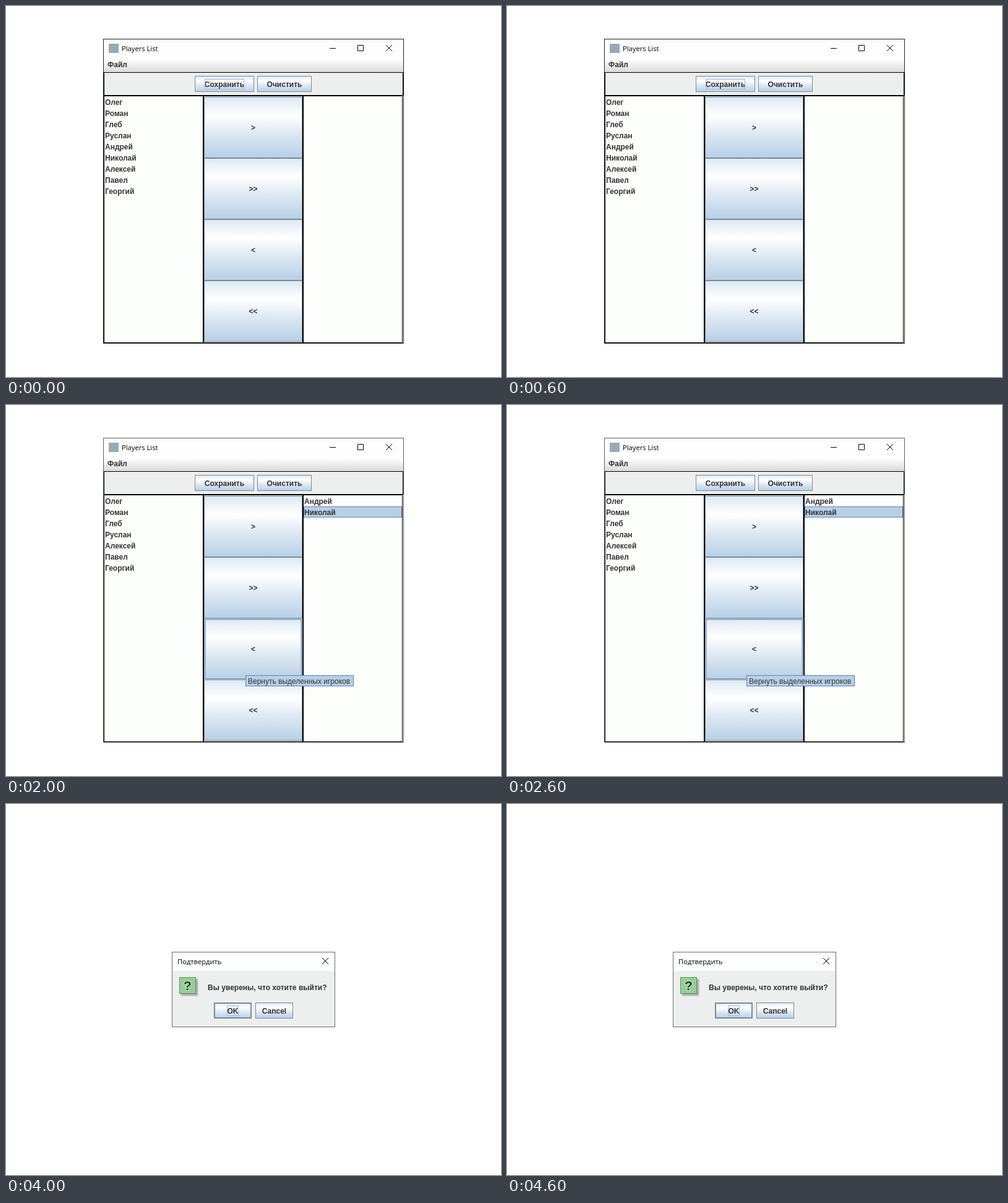
Write an HTML page that moves like this. It is 800 by 600 pixels and loops after 5 s.

```html
<!DOCTYPE html>
<html lang="ru">
<head>
<meta charset="utf-8">
<title>Players List</title>
<style>
html, body { margin: 0; width: 100%; height: 100%; overflow: hidden; background: #fff; }
svg { display: block; }
text { font: bold 12px "Liberation Sans", Arial, sans-serif; fill: #333; }
.tip { font-weight: normal; }
.title { font: 11.2px "Open Sans", "Noto Sans", sans-serif; fill: #000; }
.mid { text-anchor: middle; }
</style>
</head>
<body>
<svg width="800" height="600" viewBox="0 0 800 600">
  <defs>
    <linearGradient id="metal" x2="0" y2="1">
      <stop offset="0" stop-color="#dde8f3"/>
      <stop offset=".3" stop-color="#fff"/>
      <stop offset=".6" stop-color="#dde8f3"/>
      <stop offset="1" stop-color="#b8cfe5"/>
    </linearGradient>
    <linearGradient id="menu" x2="0" y2="1">
      <stop offset="0" stop-color="#fff"/>
      <stop offset="1" stop-color="#dadada"/>
    </linearGradient>
    <radialGradient id="bubble" cx=".4" cy=".35" r=".7">
      <stop offset="0" stop-color="#d6d6ff"/>
      <stop offset="1" stop-color="#bdbdf6"/>
    </radialGradient>
    <filter id="soft"><feGaussianBlur stdDeviation="1.2"/></filter>
  </defs>
  <g id="stage"></g>
</svg>
<script>
const PAPER = '#fdfffd', PANEL = '#edeeee', EDGE = '#7a8a99', BLUE = '#6382bf', PALE = '#b8cfe5';
const PERIOD = 5000, STEP = 1000;

// Box with a one-pixel border inside its bounds
const box = (x, y, w, h, fill, stroke) =>
  `<rect x="${x + .5}" y="${y + .5}" width="${w - 1}" height="${h - 1}" fill="${fill}" stroke="${stroke}"/>`;
const fill = (x, y, w, h, color) =>
  `<rect x="${x}" y="${y}" width="${w}" height="${h}" fill="${color}"/>`;
const text = (x, y, str, cls = '') =>
  `<text x="${x}" y="${y}" class="${cls}">${str.replace(/</g, '&lt;')}</text>`;
const line = d => `<path d="${d}" fill="none" stroke="#000"/>`;
const cross = (x, y) => line(`M${x} ${y}l10 10m0-10l-10 10`);
const focus = (x, y, w, h) => box(x, y, w, h, 'none', '#a3b8cc');

function button(x, y, w, h, label, state) {
  let s = box(x, y, w, h, 'url(#metal)', state === 'hover' ? PALE : EDGE);
  if (state === 'default') s += box(x + 1, y + 1, w - 2, h - 2, 'none', EDGE);
  if (state === 'hover') {
    s += box(x + 1, y + 1, w - 2, h - 2, 'none', '#6c87b0');
    s += box(x + 2, y + 2, w - 4, h - 4, 'none', PALE);
  }
  return s + text(x + w / 2, Math.floor(y + h / 2) + 5, label, 'mid');
}

function list(x, names, selected) {
  return box(x, 145, 161, 400, PAPER, '#000') + names.map((name, i) =>
    (i === selected ? box(x + 1, 146 + 18 * i, 159, 18, PALE, BLUE) : '') +
    text(x + 2, 160 + 18 * i, name)).join('');
}

const tip = (x, y, w, str) => box(x, y, w, 18, PALE, BLUE) + text(x + 4, y + 14, str, 'tip');

function mainWindow({ left, right = [], selected, hover, edge, extra = '' }) {
  return box(157, 53, 486, 493, PAPER, edge) +
    fill(166, 61, 16, 15, '#9aa9b6') + text(187, 73, 'Players List', 'title') +
    line('M523 68.5h10M568.5 63.5h9v9h-9z') + cross(614, 63) +
    fill(158, 86, 484, 21, 'url(#menu)') + text(164, 99, 'Файл') +
    box(158, 107, 484, 38, PANEL, '#000') +
    button(305, 113, 96, 26, 'Сохранить') + button(406, 113, 88, 26, 'Очистить') +
    list(158, left) + box(319, 145, 161, 400, PANEL, '#000') + list(480, right, selected) +
    ['>', '>>', '<', '<<'].map((label, i) =>
      button(320, 147 + 99 * i, 159, 99, label, i === hover ? 'hover' : '')).join('') +
    extra;
}

const dialog = (y, h, title, body) =>
  box(268, y, 264, h, PANEL, '#6b6b6b') + fill(269, y + 1, 262, 30, PAPER) +
  text(277, y + 20, title, 'title') + cross(511, y + 10) + body;

const infoIcon =
  '<circle cx="296" cy="295" r="13" fill="#999" opacity=".7" filter="url(#soft)"/>' +
  '<circle cx="293" cy="292" r="12.8" fill="url(#bubble)" stroke="#6666a8"/>' +
  '<path d="M291 285h4v3h-4zM290 290h5v8h1.5v1.5h-7v-1.5h1.5v-6.500h-1z" fill="#44447a"/>';

const askIcon =
  '<rect x="283" y="283" width="27" height="27" fill="#888" opacity=".7" filter="url(#soft)"/>' +
  box(280, 280, 27, 27, '#99cc99', '#5a9460') +
  '<text x="293.500" y="301" class="mid" style="font-size:21px;fill:#003c00;stroke:#d5efd5;stroke-width:2;paint-order:stroke">?</text>';

const before = ['Олег', 'Роман', 'Глеб', 'Руслан', 'Андрей', 'Николай', 'Алексей', 'Павел', 'Георгий'];
const picked = before.slice(4, 6);
const rest = before.filter(name => !picked.includes(name));

const scenes = [
  mainWindow({ left: before, edge: '#222', extra: focus(321, 118, 64, 17) }),
  mainWindow({ left: rest, right: picked, hover: 0, edge: '#566056',
    extra: focus(395, 188, 9, 17) + tip(414, 172, 183, 'Добавить выделенных игроков') }),
  mainWindow({ left: rest, right: picked, selected: 1, hover: 2, edge: '#606060',
    extra: tip(387, 437, 175, 'Вернуть выделенных игроков') }),
  dialog(238, 124, 'Выбраны следующие игроки:', infoIcon +
    picked.map((name, i) => text(326, 292 + 19 * i, name)).join('') +
    button(380, 323, 39, 26, 'OK', 'default') + focus(390, 328, 19, 17)),
  dialog(239, 122, 'Подтвердить', askIcon +
    text(326, 301, 'Вы уверены, что хотите выйти?') +
    button(336, 321, 61, 26, 'OK', 'default') + focus(357, 326, 19, 17) +
    button(403, 321, 61, 26, 'Cancel'))
];

const stage = document.getElementById('stage');
let shown = -1;
function draw() {
  const i = Math.floor(performance.now() % PERIOD / STEP);
  if (i !== shown) stage.innerHTML = scenes[shown = i];
  requestAnimationFrame(draw);
}
draw();
</script>
</body>
</html>
```
